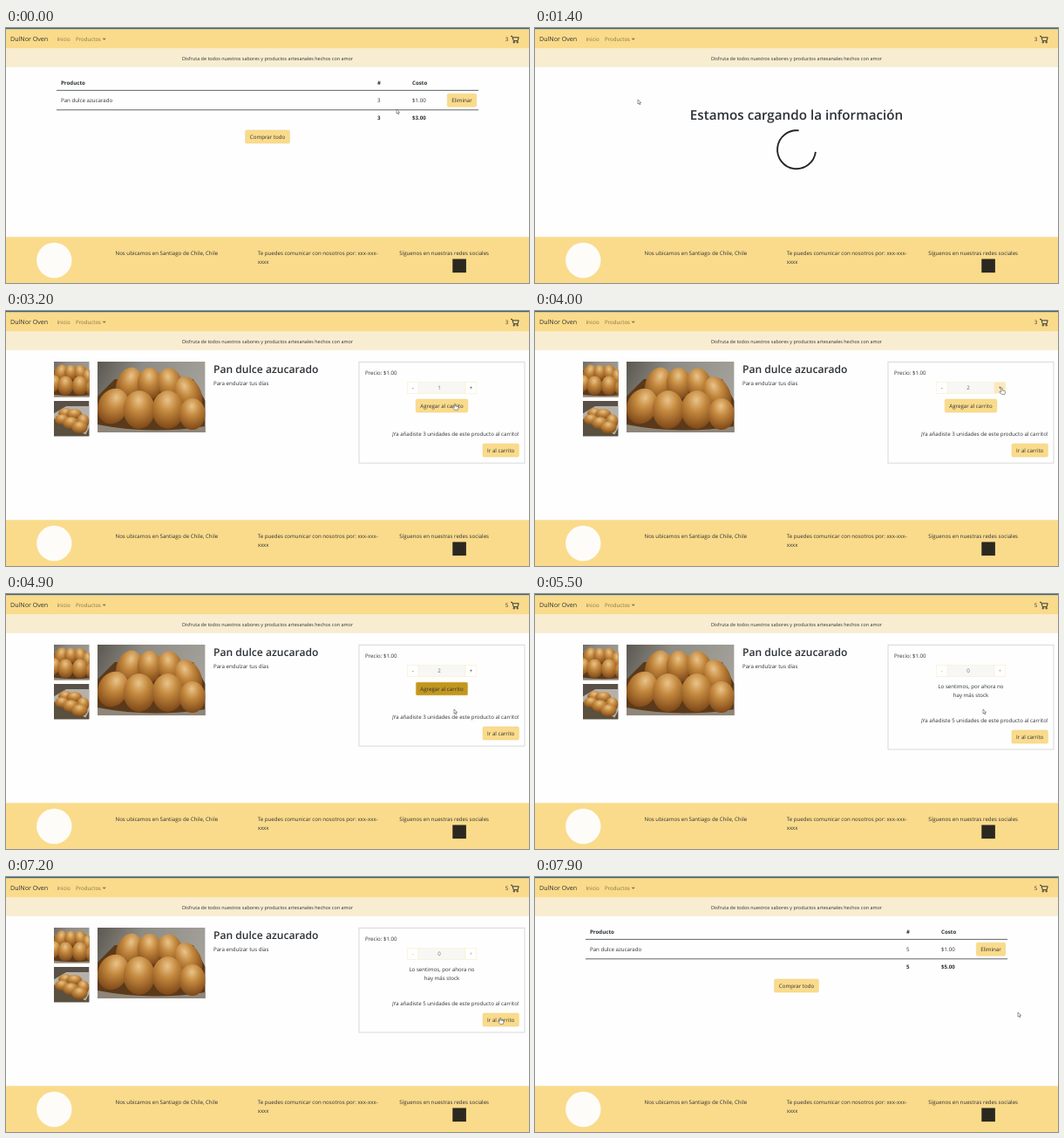
Write an HTML page that moves like this. It is 600 px wide and 292 px high and loops after 8000 ms.

```html
<!DOCTYPE html>
<html lang="es">
<head>
<meta charset="utf-8">
<title>Panadería</title>
<style>
  html, body { margin: 0; width: 100%; height: 100%; overflow: hidden; background: #fff; }
  svg { display: block; }
  text { font: 6.15px "Open Sans", "Noto Sans", sans-serif; fill: #2c3034; text-rendering: geometricPrecision; }
  .mid { text-anchor: middle; }
  .end { text-anchor: end; }
  .bold { font-weight: 700; }
  .muted { fill: #857446; }
  .btn { fill: #fadb8b; stroke: #f0cf7c; stroke-width: .5; }
  .rule { stroke: #50545a; stroke-width: .9; }
  .box { stroke: #fbefd0; stroke-width: .7; }
  .hidden { display: none; }
</style>
</head>
<body>
<svg width="600" height="292" viewBox="0 0 600 292">
  <defs>
    <radialGradient id="crust" cx=".48" cy=".25" r=".75">
      <stop offset="0" stop-color="#e9c48a"/>
      <stop offset=".4" stop-color="#c58a40"/>
      <stop offset="1" stop-color="#7d4717"/>
    </radialGradient>
    <linearGradient id="kitchen" x1="0" x2="1" y2=".3">
      <stop offset="0" stop-color="#5b5750"/>
      <stop offset=".4" stop-color="#8d8b85"/>
      <stop offset="1" stop-color="#a3a19a"/>
    </linearGradient>
    <symbol id="loaves" viewBox="0 0 124 81" preserveAspectRatio="xMidYMid slice">
      <rect width="124" height="81" fill="url(#kitchen)"/>
      <path d="M0 40L20 20H110L124 45V81H0Z" fill="#5a3a1a"/>
      <path d="M0 72Q60 84 124 74V81H0Z" fill="#8f867a"/>
      <g fill="url(#crust)">
        <ellipse cx="36" cy="26" rx="14" ry="20" transform="rotate(20 36 26)"/>
        <ellipse cx="60" cy="25" rx="14" ry="18"/>
        <ellipse cx="84" cy="26" rx="14" ry="19" transform="rotate(-15 84 26)"/>
        <ellipse cx="105" cy="37" rx="14" ry="21" transform="rotate(-25 105 37)"/>
        <ellipse cx="18" cy="51" rx="17" ry="21" transform="rotate(25 18 51)"/>
        <ellipse cx="48" cy="55" rx="18" ry="22"/>
        <ellipse cx="81" cy="55" rx="18" ry="22"/>
        <ellipse cx="109" cy="60" rx="15" ry="18"/>
      </g>
    </symbol>
    <symbol id="tray" viewBox="0 0 40 40">
      <rect width="40" height="40" fill="#595048"/>
      <path d="M0 14L14 6H40V40H0Z" fill="#b5b1aa"/>
      <path d="M3 22L36 38L40 30V40H0V20Z" fill="#59503f"/>
      <g fill="url(#crust)">
        <ellipse cx="13" cy="14" rx="8" ry="6"/>
        <ellipse cx="23" cy="15" rx="9" ry="6"/>
        <ellipse cx="33" cy="23" rx="7" ry="8"/>
        <ellipse cx="9" cy="21" rx="8" ry="6"/>
        <ellipse cx="19" cy="25" rx="9" ry="7"/>
        <ellipse cx="29" cy="30" rx="9" ry="7"/>
      </g>
    </symbol>
  </defs>

  <rect width="600" height="292" fill="#fefefe"/>
  <rect width="600" height="23.6" fill="#fadb8b"/>
  <rect width="600" height="1.2" fill="#35647c"/>
  <rect y="23.6" width="600" height="21.2" fill="#f8edd1"/>
  <text x="5" y="15.2" style="font-size:7.1px">DulNor Oven</text>
  <text x="58.4" y="15" class="muted">Inicio</text>
  <text x="80" y="15" class="muted">Productos</text>
  <path d="M110.6 11.7h4.2l-2.1 2.2z" fill="#857446"/>
  <text id="badge" x="574.5" y="15" class="mid"></text>
  <g fill="none" stroke="#212529" stroke-width=".9">
    <path d="M579 9.3h1.6l1.7 5.4h4.8l1.1-3.9h-6.9"/>
    <circle cx="582.8" cy="16.3" r=".8"/>
    <circle cx="586.7" cy="16.3" r=".8"/>
  </g>
  <text x="300" y="36.6" class="mid" style="font-size:5.45px">Disfruta de todos nuestros sabores y productos artesanales hechos con amor</text>

  <g id="cart">
    <text x="63" y="65.4" class="bold">Producto</text>
    <text x="426" y="65.4" class="bold">#</text>
    <text x="466" y="65.4" class="bold">Costo</text>
    <path class="rule" d="M58 71.4H542M58 93.8H542"/>
    <text x="63" y="85">Pan dulce azucarado</text>
    <text id="units" x="426" y="85"></text>
    <text x="466" y="85">$1.00</text>
    <rect class="btn" x="506.3" y="75.2" width="33.4" height="15" rx="1.6"/>
    <text x="523" y="85" class="mid">Eliminar</text>
    <text id="totalUnits" x="426" y="104.6" class="bold"></text>
    <text id="totalCost" x="466" y="104.6" class="bold"></text>
    <rect class="btn" x="274.6" y="117" width="50.8" height="15" rx="1.6"/>
    <text x="300" y="127" class="mid">Comprar todo</text>
  </g>

  <g id="loading">
    <text x="300" y="105.4" class="mid" style="font-size:15.2px;font-weight:600">Estamos cargando la información</text>
    <path id="spinner" d="M15.6 15.6A22 22 0 1 1 15.6 -15.6" fill="none" stroke="#212529" stroke-width="1.9"/>
  </g>

  <g id="product">
    <use href="#loaves" x="55" y="58" width="40.5" height="40.5"/>
    <use href="#tray" x="55" y="103" width="40.5" height="40.5"/>
    <use href="#loaves" x="105" y="58" width="123.5" height="81"/>
    <text x="238" y="71.3" style="font-size:12.1px;font-weight:600">Pan dulce azucarado</text>
    <text x="238" y="84.6">Para endulzar tus días</text>
    <rect id="panel" x="405" y="58.3" width="190" fill="none" stroke="#cfcfcf" stroke-width=".8"/>
    <text x="412" y="72.5">Precio: $1.00</text>
    <rect class="box" x="460.3" y="81.6" width="13" height="12.8" fill="#fff"/>
    <rect class="box" x="473" y="81.6" width="54" height="12.8" fill="#f7f7f5"/>
    <rect id="plus" class="box" x="527" y="81.6" width="12.8" height="12.8"/>
    <g id="signs"><text x="466.7" y="90" class="mid">-</text><text x="533.4" y="90" class="mid">+</text></g>
    <text id="quantity" x="497" y="90.4" class="mid" style="fill:#6a6e73"></text>
    <g id="add">
      <rect id="addButton" class="btn" x="470.2" y="101" width="59.6" height="15" rx="1.6"/>
      <text x="500" y="111" class="mid">Agregar al carrito</text>
    </g>
    <g id="soldOut">
      <text x="500" y="108" class="mid">Lo sentimos, por ahora no</text>
      <text x="500" y="117.6" class="mid">hay más stock</text>
    </g>
    <g id="summary">
      <text id="added" x="588.5" y="143" class="end"></text>
      <rect class="btn" x="547" y="152" width="41.4" height="15" rx="1.6"/>
      <text x="567.7" y="162" class="mid">Ir al carrito</text>
    </g>
  </g>

  <rect y="239.3" width="600" height="52.7" fill="#fadb8b"/>
  <circle cx="55.3" cy="266" r="20.2" fill="#fdfcf8"/>
  <text x="125.5" y="260">Nos ubicamos en Santiago de Chile, Chile</text>
  <text x="288.7" y="260">Te puedes comunicar con nosotros por: xxx-xxx-</text>
  <text x="288.7" y="269.6">xxxx</text>
  <text x="451.3" y="260">Síguenos en nuestras redes sociales</text>
  <rect x="512.3" y="264.5" width="15.6" height="15.6" fill="#2b2820"/>

  <g id="cursor" fill="#fff" stroke="#555" stroke-width=".6" stroke-linejoin="round">
    <path id="arrow" d="M0 0V5L1.1 4 2 5.9 2.8 5.5 2 3.7H3.6Z"/>
    <path id="hand" d="M-.7 .5Q0-.5 .7 .5V3L3.5 3.6Q4.1 3.9 4 4.8L3.4 7.4H-.4L-2.6 4.6Q-2.3 3.7-1.4 4.2L-.7 4.8Z"/>
  </g>
</svg>
<script>
const LOOP = 8000, STEP = 100;
const LOAD_AT = 1400, PRODUCT_AT = 2700, PLUS_AT = 3800, ADD_AT = 4600,
      BADGE_AT = 4800, SOLD_OUT_AT = 5300, CART_AT = 7700;

// time, x, y of the pointer tip
const route = [
  [0, 448, 93], [400, 448, 93], [1000, 118, 82], [1700, 118, 82], [2500, 285, 81],
  [3100, 515, 106], [3300, 515, 106], [3700, 535.5, 88], [4000, 535.5, 88],
  [4400, 514, 107], [4700, 514, 107], [4900, 514, 132], [5800, 514, 132],
  [6300, 537.5, 121.5], [6800, 567, 161], [7600, 567, 161], [7900, 554, 155], [LOOP, 554, 155]
];

const $ = id => document.getElementById(id);
const show = (id, on) => $(id).classList.toggle("hidden", !on);
const write = (id, value) => { $(id).textContent = value; };
const inside = ([x, y], left, top, right, bottom) =>
  x >= left && x <= right && y >= top && y <= bottom;

function pointerAt(t) {
  const i = route.findIndex(([time]) => time > t);
  const [t0, x0, y0] = route[i - 1], [t1, x1, y1] = route[i];
  const u = (t - t0) / (t1 - t0), k = u * u * (3 - 2 * u);
  return [x0 + (x1 - x0) * k, y0 + (y1 - y0) * k];
}

function draw(t) {
  const page = t < LOAD_AT || t >= CART_AT ? "cart" : t < PRODUCT_AT ? "loading" : "product";
  for (const id of ["cart", "loading", "product"]) show(id, id === page);

  const count = t < BADGE_AT ? 3 : 5;
  for (const id of ["badge", "units", "totalUnits"]) write(id, count);
  write("totalCost", `$${count}.00`);

  $("spinner").setAttribute("transform", `translate(300 139.3) rotate(${130 + (t - 2500) * .48})`);

  const soldOut = t >= SOLD_OUT_AT, pointer = pointerAt(t);
  show("add", !soldOut);
  show("soldOut", soldOut);
  write("quantity", soldOut ? 0 : t < PLUS_AT ? 1 : 2);
  write("added", `¡Ya añadiste ${soldOut ? 5 : 3} unidades de este producto al carrito!`);
  $("signs").setAttribute("opacity", soldOut ? .45 : 1);
  $("panel").setAttribute("height", soldOut ? 119.7 : 115.8);
  $("summary").setAttribute("transform", `translate(0 ${soldOut ? 4 : 0})`);
  $("addButton").style.fill = t >= ADD_AT ? "#c2961f" : "";

  const onPlus = !soldOut && inside(pointer, 527, 81, 540, 95);
  $("plus").setAttribute("fill", onPlus ? "#fbe9bd" : "#fff");
  const clickable = page === "cart" ? inside(pointer, 63, 78, 122, 88)
    : page === "product" && (onPlus || !soldOut && inside(pointer, 470, 101, 530, 116)
      || inside(pointer, 547, 156, 589, 171));
  show("hand", clickable);
  show("arrow", !clickable);
  $("cursor").setAttribute("transform", `translate(${pointer})`);
}

const start = performance.now();
function tick(now) {
  const t = Math.max(0, now - start) % LOOP;
  draw(Math.floor(t / STEP) * STEP);
  requestAnimationFrame(tick);
}
draw(0);
requestAnimationFrame(tick);
</script>
</body>
</html>
```
